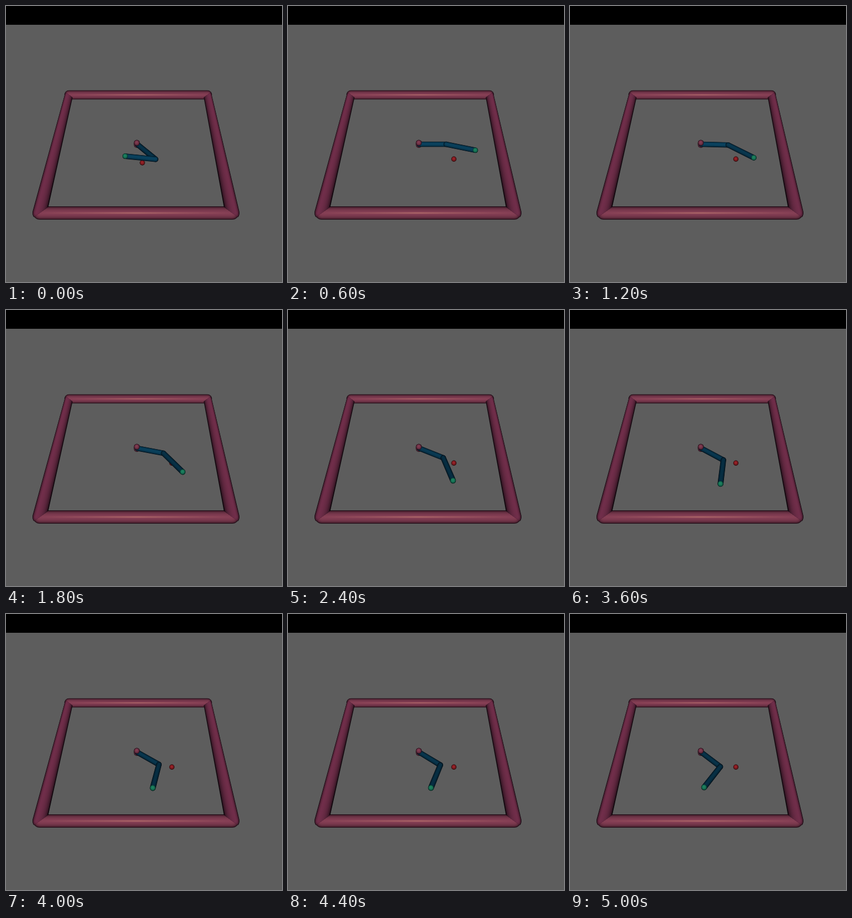
An HTML page with a canvas for the animation above (5100 ms loop, 500 by 500 pixels).

```html
<!DOCTYPE html>
<html lang="en">
<head>
<meta charset="utf-8">
<title>Two-link arm</title>
<style>
  html, body { margin: 0; width: 100%; height: 100%; overflow: hidden; background: #5d5d5d; }
  canvas { display: block; }
</style>
</head>
<body>
<canvas id="stage" width="500" height="500"></canvas>
<script>
const ctx = document.getElementById('stage').getContext('2d');
const LOOP = 5100, STEP = 100;
const LINK1 = 1 / 3, LINK2 = 0.11 / 0.3;

// time in seconds, shoulder and elbow angle in degrees
const KEYS = [
  [0.1, -1, 4], [0.6, 0.1, 16], [1.2, 2, 33.7], [2.4, 29, 45.3],
  [3.6, 36.4, 60.5], [4.4, 40, 68.4], [5, 46.3, 75]
];
const REST = [48.5, 139.2];

// edge and lit colour
const ROSE = [[30, 10, 20], [132, 62, 84]];
const PLUM = [[12, 5, 10], [112, 46, 74]];
const BLUE = [[0, 8, 15], [9, 56, 80]];
const GREEN = [[4, 40, 32], [30, 132, 98]];
const RED = [[22, 2, 4], [156, 36, 42]];

// Table plane (-1..1, y towards the viewer) to screen
function project(x, y) {
  const w = 1 - 0.1633 * y;
  return { x: (237.8 + 146 * x - 40.8 * y) / w, y: (250.5 + 63.25 * y) / w, w };
}

const mix = ([a, b], k) =>
  `rgb(${a.map((v, i) => Math.round(v + (b[i] - v) * k)).join(',')})`;

// Tapered round bar, shaded by nested outlines; (dx, dy) moves the light
function bar(a, b, ra, rb, shades, dx = 0, dy = 0) {
  const dir = Math.atan2(b.y - a.y, b.x - a.x), q = Math.PI / 2, layers = 12;
  for (let i = 0; i < layers; i++) {
    const k = i / layers, s = 1 - k;
    ctx.fillStyle = mix(shades, Math.sqrt(k * (2 - k)));
    ctx.beginPath();
    ctx.arc(a.x + dx * k * ra, a.y + dy * k * ra, ra * s, dir + q, dir + 3 * q);
    ctx.arc(b.x + dx * k * rb, b.y + dy * k * rb, rb * s, dir - q, dir + q);
    ctx.fill();
  }
}

const ball = (p, r, shades) => bar(p, p, r, r, shades, -0.1, -0.3);

// Bar across the table with a highlight that fades to its ends
function crossBar(y, r, shine) {
  const a = project(-1, y), b = project(1, y);
  bar(a, b, r, r, ROSE);
  const glow = ctx.createLinearGradient(a.x, 0, b.x, 0);
  glow.addColorStop(0, 'rgba(175,105,105,0)');
  glow.addColorStop(0.5, 'rgba(175,105,105,.8)');
  glow.addColorStop(1, 'rgba(175,105,105,0)');
  ctx.fillStyle = glow;
  ctx.fillRect(a.x, a.y - shine / 2, b.x - a.x, shine);
}

// Bar along one side (-1 or 1), mitred on the table diagonals
function sideBar(side) {
  ctx.save();
  ctx.beginPath();
  for (const [x, y] of [[1.2, -1.2], [0.8, -0.8], [0.8, 0.8], [1.2, 1.2]]) {
    const p = project(side * x, y);
    ctx.lineTo(p.x, p.y);
  }
  ctx.clip();
  bar(project(side, -1), project(side, 1), 7.5, 13, PLUM, side * 0.5, 0);
  ctx.restore();
}

function drawArena() {
  crossBar(-1, 8.2, 2);
  crossBar(1, 12, 3);
  sideBar(-1);
  sideBar(1);
}

// Monotone cubic through one column of KEYS
function sample(t, col) {
  const n = KEYS.length - 1;
  let i = 0;
  while (i < n - 1 && t > KEYS[i + 1][0]) i++;
  const slope = j => (KEYS[j + 1][col] - KEYS[j][col]) / (KEYS[j + 1][0] - KEYS[j][0]);
  const tangent = j => {
    if (j === 0) return slope(0);
    if (j === n) return slope(n - 1);
    const a = slope(j - 1), b = slope(j);
    return a * b > 0 ? 2 * a * b / (a + b) : 0;
  };
  const h = KEYS[i + 1][0] - KEYS[i][0], u = (t - KEYS[i][0]) / h, v = 1 - u;
  return KEYS[i][col] * (1 + 2 * u) * v * v + tangent(i) * h * u * v * v +
    KEYS[i + 1][col] * u * u * (3 - 2 * u) - tangent(i + 1) * h * u * u * v;
}

// Links lying across the view catch more light
function link(a, b, angle) {
  const gain = 0.85 + 0.35 * Math.cos(angle) ** 4;
  const shades = [BLUE[0], BLUE[1].map(v => v * gain)];
  bar(a, b, 4.8 / a.w, 4.8 / b.w, shades, 0, -0.2);
}

function drawArm(shoulder, elbow) {
  const rad = Math.PI / 180, a = shoulder * rad, b = (shoulder + elbow) * rad;
  const ex = LINK1 * Math.cos(a), ey = LINK1 * Math.sin(a);
  const base = project(0, 0), mid = project(ex, ey);
  const tip = project(ex + LINK2 * Math.cos(b), ey + LINK2 * Math.sin(b));
  bar({ x: 237, y: 248 }, { x: 237, y: 251.5 }, 5.4, 5.4, ROSE);
  link(base, mid, a);
  link(mid, tip, b);
  ball(tip, 4.7 / tip.w, GREEN);
  ball({ x: 237, y: 248 }, 5.2, ROSE);
}

function draw(step) {
  ctx.fillStyle = '#5d5d5d';
  ctx.fillRect(0, 0, 500, 500);
  ctx.fillStyle = '#000';
  ctx.fillRect(0, 0, 500, 34);
  drawArena();
  ball(step ? { x: 300.5, y: 277.3 } : { x: 247, y: 284 }, 4.7, RED);
  const t = step * STEP / 1000;
  drawArm(...(step ? [sample(t, 1), sample(t, 2)] : REST));
}

let shown = -1;
function tick() {
  const step = Math.floor(performance.now() % LOOP / STEP);
  if (step !== shown) draw(shown = step);
  requestAnimationFrame(tick);
}
tick();
</script>
</body>
</html>
```
